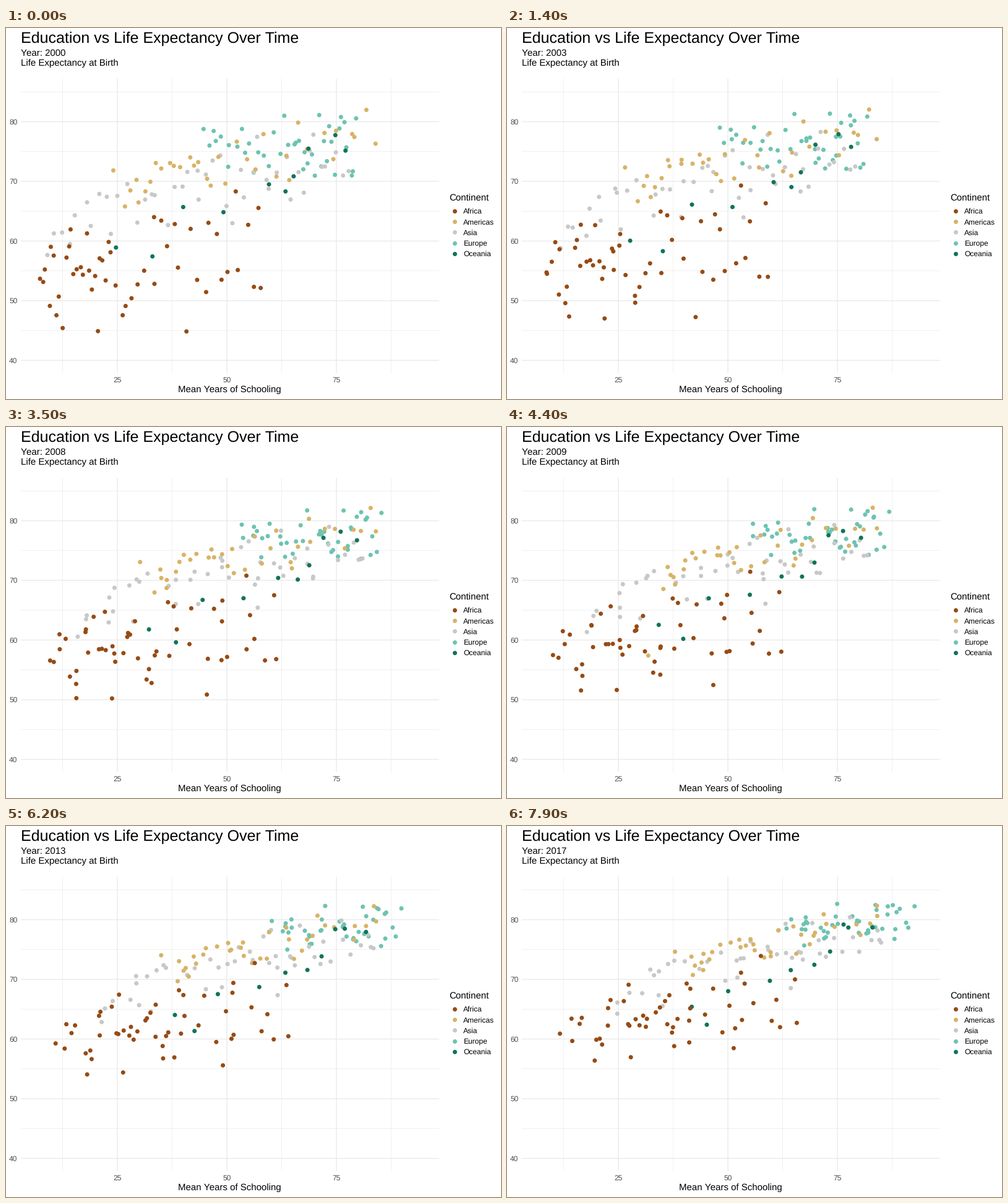
Recreate the animation shown at these times as a matplotlib script. Size 800 by 600 pixels, loop 8000 ms.

```python
import matplotlib.pyplot as plt
import numpy as np
from matplotlib.animation import FuncAnimation

W, H, DPI = 800, 600, 100
PT = 72 / DPI                      # points per pixel
FRAMES, INTERVAL = 80, 100
FIRST, LAST = 2000, 2017
CRISIS = 2010
LEFT, TOP, RIGHT, BOTTOM = 24, 82, 700, 558
X_UNIT, Y_UNIT = 7.08, 9.65        # pixels per data unit

plt.rcParams.update({"font.family": "Liberation Sans",
                     "text.hinting": "none", "text.hinting_factor": 1})

# Color, number of countries, then the shape of the cloud in FIRST and LAST:
# schooling low, median and high; life expectancy at both ends; its spread.
CONTINENTS = {
    "Africa": ("#964B14", 52, (7, 24, 59, 52, 60, 15),
               (10, 36, 68, 60, 68, 12)),
    "Americas": ("#D8B365", 35, (24, 48, 85, 69, 77, 8),
                 (35, 58, 89, 72, 80, 6)),
    "Asia": ("#C8C8C8", 45, (8, 46, 78, 62, 75, 11),
             (20, 59, 87, 67, 79, 10)),
    "Europe": ("#6DC3B2", 41, (44, 66, 80, 76, 75, 9),
               (61, 79, 94, 78, 80, 7)),
    "Oceania": ("#0F7459", 10, (22, 60, 79, 57, 76, 8),
                (31, 68, 86, 60, 80, 8)),
}
DRAW_ORDER = ["Europe", "Asia", "Americas", "Oceania", "Africa"]

YEARS = np.arange(FIRST, LAST + 1)
YEAR_FRAMES = np.round((YEARS - FIRST) * (FRAMES - 1) / (LAST - FIRST))

rng = np.random.default_rng(7)
fig = plt.figure(figsize=(W / DPI, H / DPI), dpi=DPI, facecolor="white")


def label(x, baseline, text, size, color="black", ha="left"):
    return fig.text(x / W, 1 - baseline / H, text, fontsize=size * PT,
                    color=color, ha=ha, va="baseline")


def dots(ax, xy, colors):
    x, y = np.transpose(xy)
    return ax.scatter(x, y, s=(7 * PT) ** 2, c=colors, linewidths=0, zorder=3)


def cloud_shape(rank, offset, shape):
    low, median, high, y_low, y_high, spread = shape
    x = np.interp(rank, [0, .5, 1], [low, median, high])
    along = (x - low) / (high - low)
    y = y_low + (y_high - y_low) * along + spread * (.6 + .4 * rank) * offset
    return np.column_stack((x, y))


def endpoints(name):
    """Where each country starts and ends; most keep their relative place."""
    _, count, start, end = CONTINENTS[name]
    rank = (np.arange(count) + rng.random(count)) / count
    offset = rng.triangular(-1, 0, 1, count)
    new_rank = .85 * rank + .15 * rng.random(count)
    new_offset = .8 * offset + .3 * rng.triangular(-1, 0, 1, count)
    return (cloud_shape(rank, offset, start),
            cloud_shape(new_rank, new_offset, end))


starts, ends = map(np.vstack, zip(*map(endpoints, DRAW_ORDER)))
owners = np.repeat(DRAW_ORDER, [CONTINENTS[n][1] for n in DRAW_ORDER])
stricken = np.flatnonzero(owners == "Americas")[0]


def positions(year):
    t = (year - FIRST) / (LAST - FIRST)
    xy = starts + (ends - starts) * t
    xy[stricken, 1] -= 32 * max(0, 1 - abs(year - CRISIS))
    return xy


def x_pixel(value):
    return 180 + (value - 25) * X_UNIT


def y_pixel(value):
    return 537.5 - (value - 40) * Y_UNIT


# Panel with its grid
panel = fig.add_axes([LEFT / W, 1 - BOTTOM / H,
                      (RIGHT - LEFT) / W, (BOTTOM - TOP) / H])
panel.set(xlim=(25 + (LEFT - 180) / X_UNIT, 25 + (RIGHT - 180) / X_UNIT),
          ylim=(40 + (537.5 - BOTTOM) / Y_UNIT, 40 + (537.5 - TOP) / Y_UNIT))
panel.axis("off")


def grid(draw, values, width):
    for value in values:
        draw(value, color="#EBEBEB", lw=width * PT, snap=False, zorder=1)


grid(panel.axvline, np.arange(12.5, 90, 25), .73)
grid(panel.axhline, range(45, 90, 10), .73)
grid(panel.axvline, range(25, 80, 25), 1.45)
grid(panel.axhline, range(40, 85, 10), 1.45)
for tick in range(25, 80, 25):
    label(x_pixel(tick), 573, str(tick), 12, "#4D4D4D", "center")
for tick in range(40, 85, 10):
    label(18.5, y_pixel(tick) + 4.3, str(tick), 12, "#4D4D4D", "right")

label(23.5, 24, "Education vs Life Expectancy Over Time", 25)
year_text = label(23.5, 45, "", 15)
label(23.5, 61, "Life Expectancy at Birth", 15)
label(361.5, 589, "Mean Years of Schooling", 15, ha="center")

# Legend
stage = fig.add_axes([0, 0, 1, 1])
stage.set(xlim=(0, W), ylim=(H, 0))
stage.axis("off")
label(716, 280, "Continent", 15)
for i, (name, (color, *_)) in enumerate(CONTINENTS.items()):
    row = 295.8 + 17.3 * i
    dots(stage, [(725.3, row)], [color])
    label(739, row + 4.3, name, 12)

cloud = dots(panel, positions(FIRST), [CONTINENTS[n][0] for n in owners])


def update(frame):
    cloud.set_offsets(positions(np.interp(frame, YEAR_FRAMES, YEARS)))
    shown = round(FIRST + frame * (LAST - FIRST) / (FRAMES - 1))
    year_text.set_text(f"Year: {shown}")
    return cloud, year_text


anim = FuncAnimation(fig, update, frames=FRAMES, interval=INTERVAL,
                     repeat=True, repeat_delay=0, blit=False)
plt.show()
```
